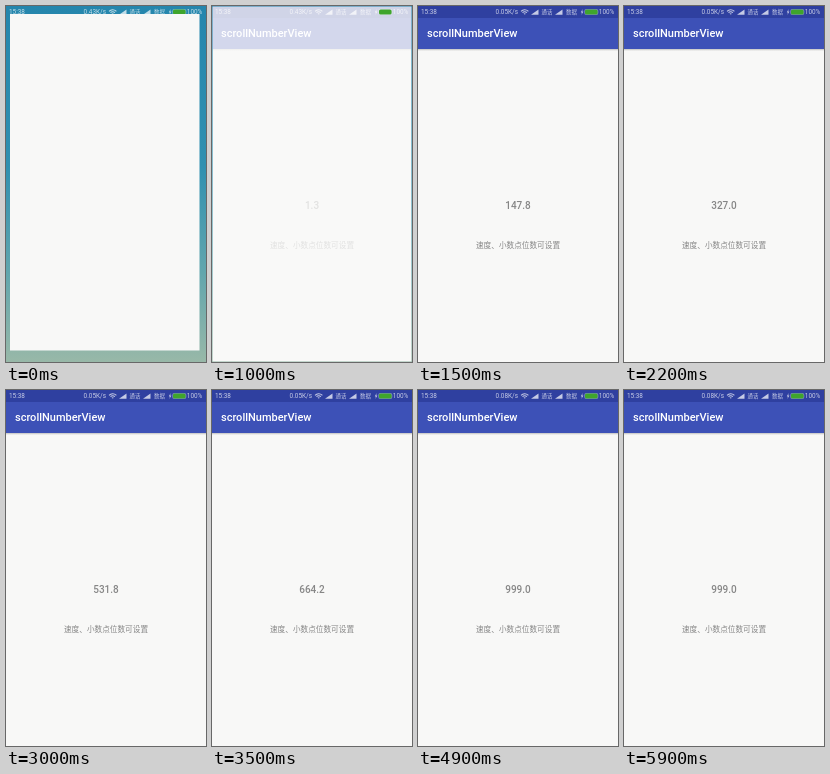
Recreate the animation shown at these times as an HTML page with a canvas. Size 200 by 356 pixels, loop 6 s.

```html
<!DOCTYPE html>
<html lang="zh">
<head>
<meta charset="utf-8">
<title>scrollNumberView</title>
<style>
html, body { margin: 0; width: 100%; height: 100%; overflow: hidden; background: #f8f8f7; }
canvas { display: block; width: 200px; height: 356px; }
</style>
</head>
<body>
<canvas id="stage"></canvas>
<script>
const W = 200, H = 356, LOOP = 6000, STEP = 100;
const PAPER = '#f8f8f7', GREY = '#868686';
const LATIN = 'Roboto, "Noto Sans", sans-serif';
const HAN = '"Noto Sans CJK SC", "Noto Sans CJK", sans-serif';
const canvas = document.getElementById('stage');
const dpr = window.devicePixelRatio || 1;
canvas.width = W * dpr;
canvas.height = H * dpr;
const ctx = canvas.getContext('2d');

// time, value
const COUNT = [[1000, 1.3], [1500, 147.8], [3000, 531.8], [4000, 796.6], [4800, 999]];

function countAt(t) {
  for (let i = 1; i < COUNT.length; i++) {
    const [t0, v0] = COUNT[i - 1], [t1, v1] = COUNT[i];
    if (t < t1) return v0 + (v1 - v0) * (t - t0) / (t1 - t0);
  }
  return 999;
}

function rect(x, y, w, h, color) {
  ctx.fillStyle = color;
  ctx.fillRect(x, y, w, h);
}

function pill(x, y, w, h, r, color) {
  ctx.fillStyle = color;
  ctx.beginPath();
  ctx.roundRect(x, y, w, h, r);
  ctx.fill();
}

function text(s, x, y, font, color, align = 'left') {
  ctx.font = font;
  ctx.fillStyle = color;
  ctx.textAlign = align;
  ctx.fillText(s, x, y);
}

function poly(points, color) {
  ctx.fillStyle = color;
  ctx.beginPath();
  points.forEach(([x, y]) => ctx.lineTo(x, y));
  ctx.fill();
}

function wallpaper() {
  const g = ctx.createLinearGradient(0, 0, 0, H);
  g.addColorStop(0, '#2586ad');
  g.addColorStop(0.45, '#3090b0');
  g.addColorStop(0.75, '#62a6ad');
  g.addColorStop(1, '#98b8a8');
  rect(0, 0, W, H, g);
}

function wifi(x, y, color) {
  ctx.strokeStyle = color;
  ctx.lineWidth = 1.1;
  for (const r of [1, 3, 5]) {
    ctx.beginPath();
    ctx.arc(x, y, r, -Math.PI * 0.76, -Math.PI * 0.24);
    ctx.stroke();
  }
}

function statusBar(speed) {
  const ink = 'rgba(255,255,255,.72)';
  const small = '6.4px ' + LATIN;
  text('15:38', 3, 8.3, small, ink);
  text(speed + 'K/s', 100, 8.3, small, ink, 'right');
  wifi(106.7, 8.8, ink);
  for (const x of [113, 137]) poly([[x, 8.7], [x + 7.5, 8.7], [x + 7.5, 3.4]], ink);
  text('通话', 123.6, 8.2, '5.4px ' + HAN, ink);
  text('数据', 148, 8.2, '5.4px ' + HAN, ink);
  poly([[164.6, 3], [162.8, 6.4], [164, 6.4], [163.4, 9], [165.4, 5.5], [164.2, 5.5]], ink);
  pill(166.3, 2.9, 14, 6.2, 2, 'rgba(255,255,255,.4)');
  pill(167, 3.5, 12.6, 5, 1.6, '#3fa52c');
  text('100%', 196.3, 8.3, small, ink, 'right');
}

function app(value) {
  rect(0, 0, W, H, PAPER);
  const shade = ctx.createLinearGradient(0, 43, 0, 45);
  shade.addColorStop(0, 'rgba(0,0,0,.22)');
  shade.addColorStop(1, 'rgba(0,0,0,0)');
  rect(0, 43, W, 2, shade);
  rect(0, 0, W, 12, '#2f40a0');
  rect(0, 12, W, 31, '#3d51b7');
  text(value.toFixed(1), 100, 203, '500 10px ' + LATIN, GREY, 'center');
  text('速度、小数点位数可设置', 100, 242, '500 7.65px ' + HAN, GREY, 'center');
}

function draw(time) {
  const t = Math.floor(time % LOOP / STEP) * STEP;
  ctx.setTransform(dpr, 0, 0, dpr, 0, 0);
  ctx.globalAlpha = 1;
  if (t < 1000) {
    wallpaper();
    statusBar('0.43');
    rect(4, 8, 189.5, 336.5, PAPER);
    return;
  }
  const fade = Math.min(1, 0.2 + (t - 1000) / 250);
  const edge = fade < 1 ? 0.6 : 0;
  wallpaper();
  rect(edge, edge, W - 2 * edge, H - 2 * edge, PAPER);
  ctx.save();
  ctx.beginPath();
  ctx.rect(edge, edge, W - 2 * edge, H - 2 * edge);
  ctx.clip();
  ctx.globalAlpha = fade;
  app(countAt(t));
  ctx.restore();
  text('scrollNumberView', 9, 31.3, '500 11px ' + LATIN, '#fff');
  statusBar(t < 1100 ? '0.43' : t < 4900 ? '0.05' : '0.08');
}

const start = performance.now();
function tick() {
  draw(performance.now() - start);
  requestAnimationFrame(tick);
}
tick();
</script>
</body>
</html>
```
